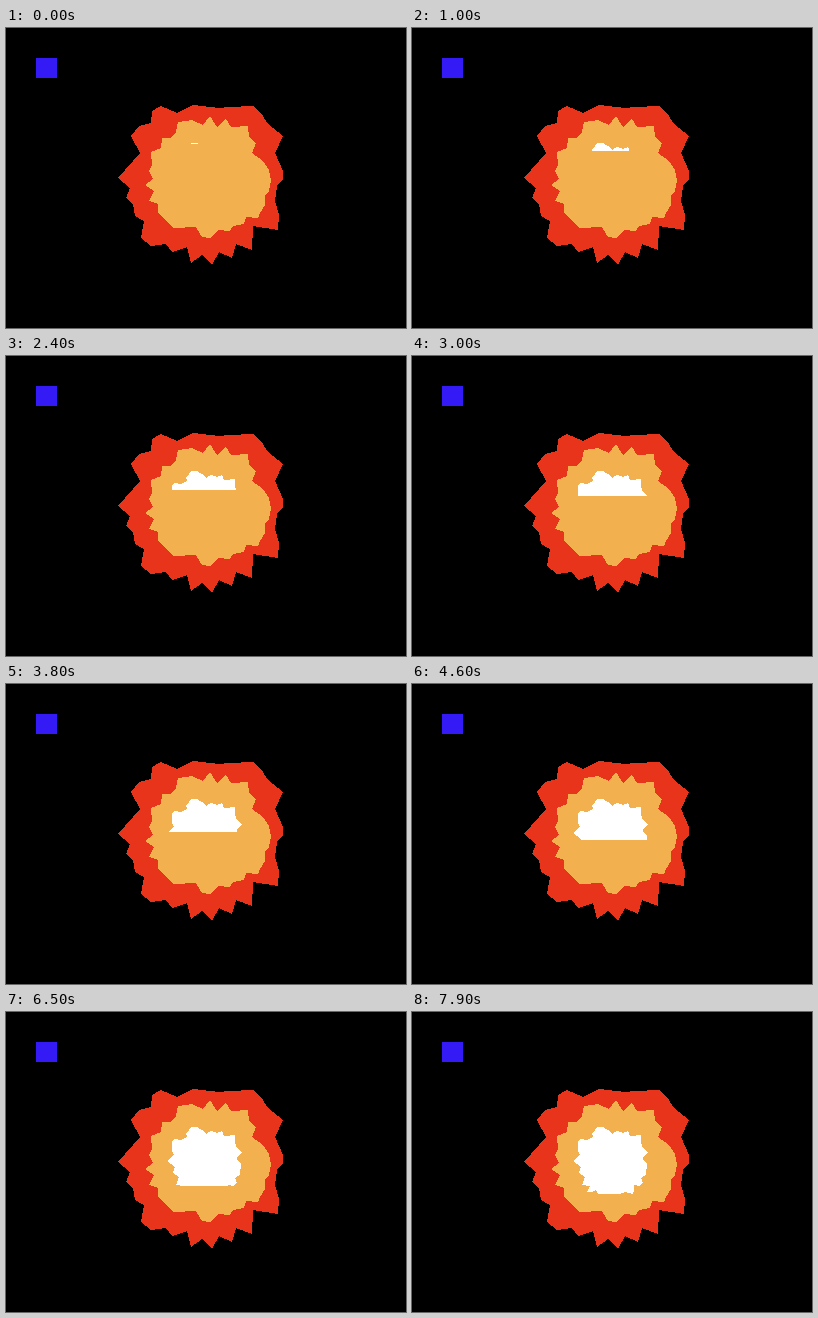
Write an HTML page without scripts that moves like this. It is 400x300 px and loops after 8 s.

```html
<!DOCTYPE html>
<html lang="en">
<head>
<meta charset="utf-8">
<title>Scanline fill</title>
<style>
  @property --row { syntax: "<length>"; inherits: false; initial-value: 116px; }
  @property --split { syntax: "<length>"; inherits: false; initial-value: 0px; }

  html, body { margin: 0; width: 100%; height: 100%; overflow: hidden; background: #000; }
  svg { position: absolute; left: 0; top: 0; width: 400px; height: 300px; shape-rendering: crispEdges; }

  /* Finished rows lie above --row; the next row is filled up to --split. */
  .core {
    clip-path: polygon(0 0, 400px 0, 400px var(--row), var(--split) var(--row),
      var(--split) calc(var(--row) + 1px), 0 calc(var(--row) + 1px));
    animation: rows 8s infinite, spans 8s step-end infinite;
  }

  /* One span per 1.25%; rows with two spans take two steps. */
  @keyframes rows {
    0%      { --row: 116px; animation-timing-function: steps(3); }
    3.75%   { --row: 119px; animation-timing-function: step-end; }
    6.25%   { --row: 120px; animation-timing-function: step-end; }
    8.75%   { --row: 121px; animation-timing-function: step-end; }
    11.25%  { --row: 122px; animation-timing-function: steps(1); }
    12.5%   { --row: 123px; animation-timing-function: step-end; }
    15%     { --row: 124px; animation-timing-function: steps(3); }
    18.75%  { --row: 127px; animation-timing-function: step-end; }
    21.25%  { --row: 128px; animation-timing-function: step-end; }
    23.75%  { --row: 129px; animation-timing-function: steps(42); }
    76.25%  { --row: 171px; animation-timing-function: step-end; }
    78.75%  { --row: 172px; animation-timing-function: steps(3); }
    82.5%   { --row: 175px; animation-timing-function: step-end; }
    85%     { --row: 176px; animation-timing-function: step-end; }
    87.5%   { --row: 177px; animation-timing-function: steps(1); }
    88.75%  { --row: 178px; animation-timing-function: step-end; }
    91.25%  { --row: 179px; animation-timing-function: step-end; }
    93.75%  { --row: 180px; animation-timing-function: step-end; }
    96.25%  { --row: 181px; animation-timing-function: step-end; }
    98.75%, 100% { --row: 182px; }
  }
  @keyframes spans {
    0%, 6.25%, 8.75%, 11.25%, 15%, 21.25%, 23.75%, 78.75%, 85%, 87.5%,
    91.25%, 93.75%, 96.25%, 98.75%, 100% { --split: 0px; }
    5%, 7.5%, 10% { --split: 200px; }
    13.75% { --split: 218px; }
    20%, 22.5% { --split: 178px; }
    77.5%, 83.75%, 86.25% { --split: 180px; }
    90%, 92.5%, 95%, 97.5% { --split: 185px; }
  }
</style>
</head>
<body>
<svg viewBox="0 0 400 300">
  <rect x="30" y="30" width="21" height="20" fill="#341af5"/>
  <polygon fill="#e7341b" points="146,83 155,78 171,85 187,77 196,78 213,80 222,79 247,78 255,85 262,96
    277,108 269,125 277,143 277,151 271,158 269,173 273,187 272,202 247,198 246,222
    230,216 226,230 213,224 206,237 196,227 185,235 181,219 166,224 160,216 145,218 135,210 138,193
    129,188 127,176 120,170 124,160 112,150 134,125 125,108 133,98 145,95"/>
  <polygon fill="#f2b04e" points="172,94 186,92 197,97 204,88 211,99 220,91 225,99 242,98 243,109 250,115
    246,125 257,133 263,142 265,152 263,163 259,167 259,177 254,185 252,190 240,189 238,196 227,198
    224,203 212,202 204,210 196,209 190,199 168,200 158,191 152,185 152,176 143,173 148,163 139,157
    147,151 143,143 146,137 145,124 155,120 156,110 165,110 170,104"/>
</svg>
<svg class="core" viewBox="0 0 400 300">
  <polygon fill="#fff" points="185,115 191,115 196,118 200,122 205,119 211,121 216,119 218,124 229,123
    229,130 231,136 236,140 232,144 231,147 235,152 234,163 229,166 231,171 227,174 222,173 222,178
    221,182 213,180 208,182 186,182 184,178 180,180 175,180 178,174 170,173 173,165 167,161 169,155
    161,149 168,143 166,139 166,129 169,127 175,128 179,126 181,124 180,121 183,118"/>
</svg>
</body>
</html>
```
